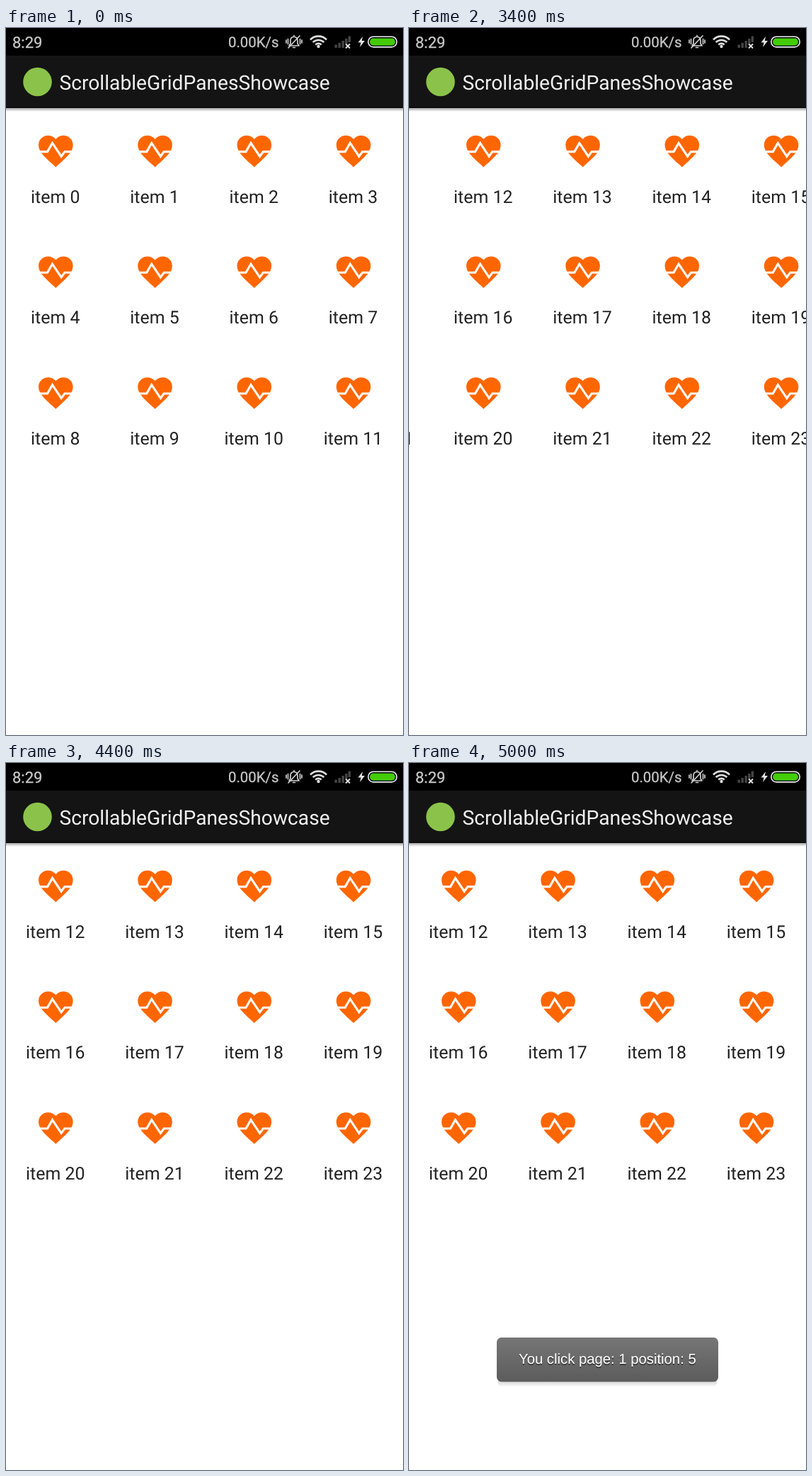
An HTML page that plays this animation: 561x998 px, repeating every 5.1 s.

```html
<!DOCTYPE html>
<html lang="en">
<head>
<meta charset="utf-8">
<title>Paged grid</title>
<style>
  html, body { margin: 0; width: 100%; height: 100%; overflow: hidden; background: #fff; }
  svg { display: block; width: 100%; height: 100%; }
  text { font-family: Roboto, "Noto Sans", sans-serif; text-rendering: geometricPrecision; }
  .item { font-size: 24.9px; fill: #222; text-anchor: middle; }
  .status { fill: #c8c8c8; stroke: #c8c8c8; stroke-width: .3px; }
  .toast { font: 20.3px "Liberation Sans", Arial, sans-serif; }
</style>
</head>
<body>
<svg viewBox="0 0 561 998" xmlns="http://www.w3.org/2000/svg">
  <defs>
    <linearGradient id="barShadow" x2="0" y2="1">
      <stop offset="0" stop-color="#000" stop-opacity=".36"/>
      <stop offset="1" stop-color="#000" stop-opacity="0"/>
    </linearGradient>
    <linearGradient id="toastFill" x2="0" y2="1">
      <stop offset="0" stop-color="#767676"/>
      <stop offset="1" stop-color="#5c5c5c"/>
    </linearGradient>
    <linearGradient id="toastShadow" x2="0" y2="1">
      <stop offset=".5" stop-color="#000" stop-opacity=".2"/>
      <stop offset="1" stop-color="#000" stop-opacity="0"/>
    </linearGradient>
    <g id="heart">
      <path fill="#ff6600" transform="scale(2.43) translate(-12 -3)"
        d="M12 21.35 10.55 20C5.4 15.36 2 12.28 2 8.5 2 5.42 4.42 3 7.5 3 9.24 3 10.91 3.81 12 5.09 13.09 3.81 14.76 3 16.5 3 19.58 3 22 5.42 22 8.5 22 12.28 18.6 15.36 13.45 20Z"/>
      <path fill="none" stroke="#fff" stroke-width="3.1" d="M-26 22.8H-11.8L-4.8 10.6 7.8 29.4 12.6 22.8H26"/>
    </g>
  </defs>

  <rect width="561" height="998" fill="#fff"/>
  <g id="pages"></g>

  <rect y="113" width="561" height="5" fill="url(#barShadow)"/>
  <rect width="561" height="113" fill="#141414"/>
  <rect y="111.5" width="561" height="1.5" fill="#080808"/>
  <rect width="561" height="39" fill="#000"/>
  <circle cx="44.5" cy="76" r="20.3" fill="#8bc34a"/>
  <text x="75.5" y="87.4" font-size="28.2" fill="#f1f1f1">ScrollableGridPanesShowcase</text>

  <text class="status" x="9" y="27.6" font-size="22">8:29</text>
  <text class="status" x="314" y="27.4" font-size="20.4">0.00K/s</text>

  <!-- muted bell -->
  <g fill="none" stroke="#d0d0d0" stroke-width="1.7" stroke-linecap="round" stroke-linejoin="round">
    <path d="M400 25H414L412 22V18C412 14.500 410 12.500 407 12.500S402 14.500 402 18V22ZM407 12V10.500M405.500 27.500H408.500"/>
    <path d="M399 28 415 11M398.500 15.500V22.500M396 17V21M415.500 15.500V22.500M418 17V21"/>
  </g>
  <!-- wireless -->
  <g fill="none" stroke="#dedede" stroke-width="2.6">
    <path d="M430 16.500A16 16 0 0 1 453 16.500M433.700 20.200A11 11 0 0 1 449.300 20.200M437.300 23.600A6 6 0 0 1 445.700 23.600"/>
  </g>
  <circle cx="441.500" cy="26" r="2.200" fill="#dedede"/>
  <!-- cell signal -->
  <path fill="none" stroke="#444" stroke-width="3.4" d="M466.200 28V23.500M471.200 28V21M476.200 28V18M480.800 22V15M485.300 20V11.500"/>
  <path stroke="#e0e0e0" stroke-width="2" d="M480 22.500 486 28.500M486 22.500 480 28.500"/>
  <!-- battery -->
  <path fill="#e4e4e4" d="M504 12 497.500 20.500H501.500L500 27 507 18H502.800Z"/>
  <rect x="511.800" y="12.300" width="40.400" height="14.600" rx="7.300" fill="#000" stroke="#f0f0f0" stroke-width="1.600"/>
  <rect x="514" y="14.500" width="36" height="10.200" rx="5.100" fill="#43cc05"/>

  <g id="toast">
    <rect x="126" y="860" width="309" height="21" rx="6" fill="url(#toastShadow)"/>
    <rect x="124" y="811" width="313" height="62.500" rx="6.500" fill="url(#toastFill)"/>
    <text class="toast" x="155" y="849.500" fill="#000" opacity=".45">You click page: 1 position: 5</text>
    <text class="toast" x="155" y="848.300" fill="#fff">You click page: 1 position: 5</text>
  </g>
</svg>
<script>
  const LOOP = 5100, STEP = 100, PAGE_WIDTH = 561;
  const COLUMN = PAGE_WIDTH / 4, ROW = 170.7;
  const pages = document.getElementById('pages');
  const toast = document.getElementById('toast');

  function gridPage(page) {
    let markup = '';
    for (let i = 0; i < 12; i++) {
      const x = page * PAGE_WIDTH + (i % 4 + 0.5) * COLUMN;
      const y = Math.floor(i / 4) * ROW;
      markup += `<use href="#heart" x="${x + 0.2}" y="${151.8 + y}"/>` +
        `<text class="item" x="${x - 0.4}" y="${246.6 + y}">item ${page * 12 + i}</text>`;
    }
    return markup;
  }
  pages.innerHTML = gridPage(0) + gridPage(1);

  // A small drag, then a quintic settle onto the second page.
  function scrollAt(t) {
    if (t < 3100) return 0;
    if (t < 3200) return 1;
    const left = Math.max(0, (3788 - t) / 488);
    return PAGE_WIDTH - Math.round(111 * left ** 5);
  }

  function render(time) {
    const t = Math.floor(time % LOOP / STEP) * STEP;
    pages.setAttribute('transform', `translate(${-scrollAt(t)} 0)`);

    const hidden = Math.max(0, (5000 - t) / 408) ** 2;
    toast.setAttribute('visibility', t < 4700 ? 'hidden' : 'visible');
    toast.setAttribute('opacity', Math.max(0, 1 - hidden));
    toast.setAttribute('transform', `translate(0 ${Math.round(62 * hidden)})`);
  }

  const start = performance.now();
  function tick() {
    render(performance.now() - start);
    requestAnimationFrame(tick);
  }
  tick();
</script>
</body>
</html>
```
